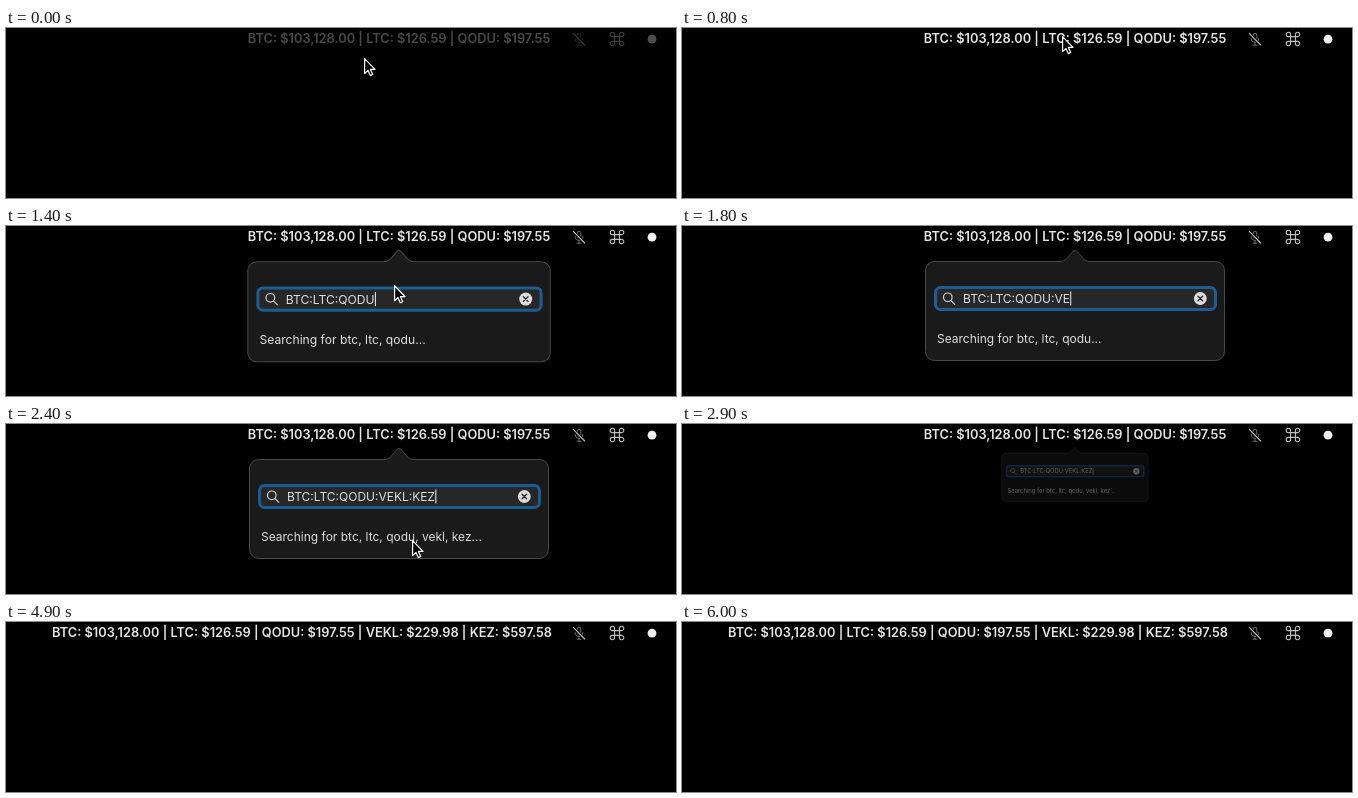
An HTML page for the animation above (6500 ms loop, 670 px wide and 170 px high).

```html
<!DOCTYPE html>
<html lang="en">
<head>
<meta charset="utf-8">
<title>Menu bar ticker</title>
<style>
  html, body { margin: 0; width: 100%; height: 100%; overflow: hidden; background: #000; }
  svg { display: block; width: 670px; height: 170px; }
  text { font-family: Inter, Roboto, "Noto Sans", sans-serif; white-space: pre; }
  #prices { font-size: 12.8px; font-weight: 600; fill: #e4e4e4; text-anchor: middle; }
  #popup text { font-size: 12px; fill: #dedede; }
  .line { fill: none; stroke-linecap: round; stroke-linejoin: round; }
</style>
</head>
<body>
<svg viewBox="0 0 670 170">
  <rect width="670" height="170" fill="#000"/>
  <rect id="glow" x="230" width="326" height="22" rx="4" fill="#fff"/>
  <g id="bar">
    <text id="prices" y="15"></text>
    <g class="line">
      <path stroke="#777" stroke-width=".9" d="M571.2 7v3.600a1.800 1.800 0 0 0 3.600 0V7a1.800 1.800 0 0 0-3.600 0M569.200 10.500a3.800 3.800 0 0 0 7.600 0M573 14.400v2.800M571 17.200h4"/>
      <path stroke="#000" stroke-width="2.6" d="M567.3 5.3L578.7 17"/>
      <path stroke="#c0c0c0" stroke-width="1.1" d="M567.3 5.3L578.7 17"/>
      <path stroke="#c0c0c0" stroke-width="1.1" d="M608.6 13.4V6.4A2.2 2.2 0 1 0 606.4 8.6H615.6A2.2 2.2 0 1 0 613.4 6.4V15.6A2.2 2.2 0 1 0 615.6 13.4H606.4A2.2 2.2 0 1 0 608.6 15.6Z"/>
    </g>
    <circle cx="646" cy="11.2" r="4.4" fill="#f0f0f0"/>
  </g>
  <g id="popup">
    <path fill="#1a1a1a" stroke="#484848" d="M252.5 35.5H378C384 35.5 386 31 390 26.5Q393 22.5 396 26.5C400 31 402 35.5 408 35.5H533.5a9 9 0 0 1 9 9V125.5a9 9 0 0 1-9 9H252.5a9 9 0 0 1-9-9V44.5a9 9 0 0 1 9-9Z"/>
    <rect x="253.5" y="61.5" width="280" height="22" rx="5" fill="#272727" stroke="#1b5d92" stroke-width="3"/>
    <path class="line" stroke="#cfcfcf" stroke-width="1.2" d="M261.5 71.3a4.3 4.3 0 1 1 8.6 0a4.3 4.3 0 1 1-8.6 0M269 74.5l3.800 3.800"/>
    <text id="query" x="281" y="77"></text>
    <rect id="caret" y="65.5" width="1" height="14" fill="#f0f0f0"/>
    <circle cx="518.3" cy="72.5" r="6.4" fill="#dcdcdc"/>
    <path class="line" stroke="#222" stroke-width="1.3" d="M516 70.2l4.6 4.6M520.6 70.2l-4.6 4.6"/>
    <text id="label" x="255" y="117"></text>
  </g>
  <path id="cursor" d="M.6 .6V15.6L4 12.4L6.3 17.6L8.7 16.5L6.4 11.4H11Z" fill="#000" stroke="#fff" stroke-width="1.2" stroke-linejoin="round"/>
</svg>
<script>
const LOOP = 6500;
const STEP = 100;
const $ = id => document.getElementById(id);

const SHORT = 'BTC: $103,128.00 | LTC: $126.59 | QODU: $197.55';
const LONG = SHORT + ' | VEKL: $229.98 | KEZ: $597.58';
const QUERY = 'BTC:LTC:QODU';
const ADDED = ':VEKL:KEZ';

const ramp = (t, from, to) => Math.min(1, Math.max(0, (t - from) / (to - from)));
const mix = (a, b, p) => a + (b - a) * p;
const easeOut = p => 1 - (1 - p) ** 3;

function cursorAt(t) {
  const glide = (from, to, a, b, ease = p => p) => {
    const p = ease(ramp(t, from, to));
    return [mix(a[0], b[0], p), mix(a[1], b[1], p)];
  };
  if (t < 500) {
    const [x, y] = glide(0, 300, [358, 30], [458, 45]);
    return [x, y - 24 * Math.sin(Math.PI * ramp(t, 0, 300))];
  }
  if (t < 900) return glide(500, 800, [458, 45], [380, 8]);
  if (t < 1200) return glide(900, 1200, [380, 8], [374, 11]);
  if (t < 1700) return glide(1200, 1600, [374, 11], [390, 66], easeOut);
  if (t >= 2400 && t < 2900) return glide(2400, 2900, [406, 116], [600, 168]);
  return null;
}

// Springs slightly past full size on opening, shrinks into the arrow on closing.
function popupScale(t) {
  const spring = 1.92;
  const open = Math.sin(spring * ramp(t, 1000, 1600) ** 1.05) / Math.sin(spring);
  return open * (1 - ramp(t, 2400, 3100) ** 2);
}

function setText(el, value) {
  if (el.textContent !== value) el.textContent = value;
}

function setAttrs(el, attrs) {
  for (const name in attrs) el.setAttribute(name, attrs[name]);
}

function drawBar(t) {
  const pressed = t >= 1000 && t < 1300;
  const grown = t >= 4900;
  setAttrs($('bar'), { opacity: mix(.32, 1, ramp(t, 500, 800)) });
  setAttrs($('glow'), { opacity: pressed ? mix(.16, 0, ramp(t, 1000, 1200)) : 0 });
  setAttrs($('prices'), { x: grown ? 296 : 393, stroke: pressed ? '#fff' : 'none', 'stroke-width': .3 });
  setText($('prices'), grown ? LONG : SHORT);
}

function drawPopup(t) {
  const typed = Math.round(ADDED.length * ramp(t, 1600, 2300));
  const scale = popupScale(t);
  setText($('query'), QUERY + ADDED.slice(0, typed));
  setText($('label'), `Searching for btc, ltc, qodu${t < 2400 ? '' : ', vekl, kez'}...`);
  setAttrs($('caret'), { x: 281.3 + $('query').getComputedTextLength() });
  setAttrs($('popup'), {
    opacity: Math.min(1, scale ** 1.15),
    transform: `translate(393 23) scale(${scale || .01}) translate(-393 -23)`
  });
}

function drawCursor(t) {
  const spot = cursorAt(t);
  $('cursor').style.display = spot ? '' : 'none';
  if (spot) setAttrs($('cursor'), { transform: `translate(${spot})` });
}

const start = performance.now();
function tick() {
  const now = (performance.now() - start) % LOOP;
  const t = Math.floor(now / STEP) * STEP;
  drawBar(t);
  drawPopup(t);
  drawCursor(t);
  requestAnimationFrame(tick);
}
tick();
</script>
</body>
</html>
```
